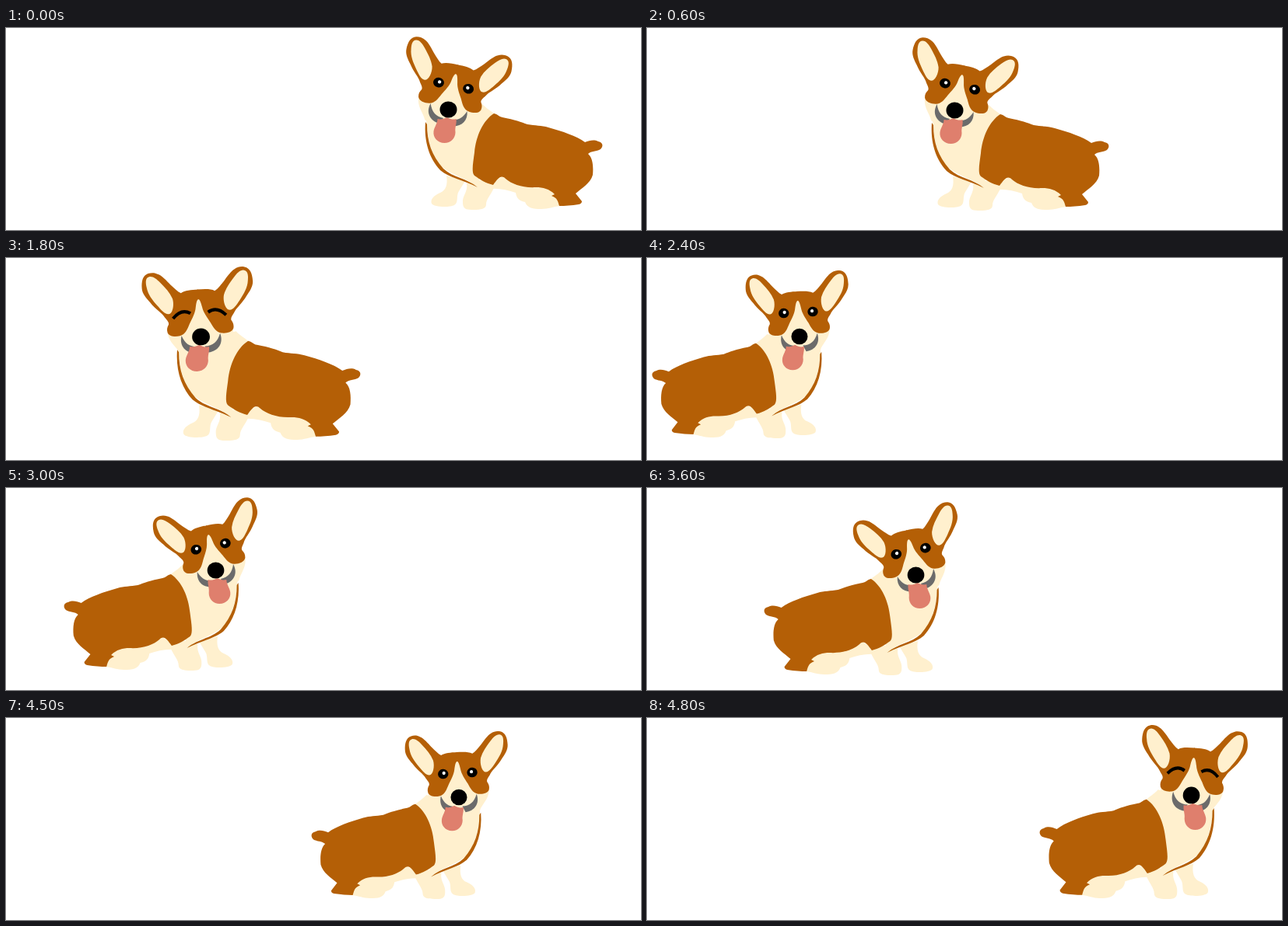
These frames come from a looping animation (816 px wide and 260 px high, 5.1 s). An HTML page:

```html
<!DOCTYPE html>
<html lang="en">
<head>
<meta charset="utf-8">
<title>Strolling corgi</title>
<style>
  html, body { margin: 0; width: 100%; height: 100%; overflow: hidden; background: #fff; }
  svg { display: block; width: 816px; height: 260px; }
  .brown { fill: #b45f06; }
  .cream { fill: #fff0ce; }
  .tongue { fill: #df7f6d; }
  .mouth { fill: #6b6b6b; }
  .lid { fill: none; stroke: #000; stroke-width: 4; }
</style>
</head>
<body>
<svg viewBox="0 0 816 260">
  <defs>
    <g id="fur">
      <path class="brown" d="M-.5-59C8-59 16-59 21-56C25-58 29-63 33-67C38-73 43-79 47-81C52-84 56-84 60-83C67-81 69-74 69-65C69-58 64-52 60-47C54-38 46-33 43-27C41-24 38-21 39-18C41-15 42-12 41-8C39-3 32-2 26-3C19-4 16-11 13-17C9-24 5-30 4-37C3-42 2-47-.5-47Z"/>
      <path class="cream" d="M59-79C55-80 50-76 46-71C40-64 35-58 32-50C30-42 33-31 38-31C43-31 47-37 51-42C57-50 62-57 63-66C64-72 64-78 59-79Z"/>
      <path class="mouth" d="M24-3C28 10 20 19 8 20L4 12C14 12 20 8 24-3Z"/>
    </g>
    <g id="eye"><ellipse cx="19.500" cy="-31.500" rx="7" ry="6.300"/></g>
    <path id="lid" class="lid" d="M11-30Q22-37 33-25"/>
  </defs>
  <g id="dog">
    <g class="cream">
      <path d="M566 190C568 202 565 209 558 212C549 216 545 221 547 226C550 231 571 231 576 228C582 225 578 216 582 210L590 197Z"/>
      <path d="M592 200C594 211 586 216 587 225C587 234 593 234 601 234C610 234 617 233 617 227C617 221 622 216 627 206L637 189Z"/>
      <path d="M622 207C634 206 645 209 655 212C656 218 658 222 667 224C670 232 677 233 688 233C697 233 703 230 712 229L705 209L640 188Z"/>
      <path d="M540 116C541 140 545 160 558 177C570 188 586 191 606 204L627 110C622 106 618 104 612 98Z"/>
    </g>
    <path class="brown" d="M539 121C537 146 544 168 558 183C570 193 586 195 606 205C592 193 575 193 562 181C547 164 541 146 541 124Z"/>
    <path class="brown" d="M627 110C632 111 633 114 638 115C654 118 662 121 670 124C680 126 688 125 697 128C715 133 733 139 744 147C750 145 755 143 761 146C767 147 768 152 764 156C759 159 752 158 748 162C754 167 755 178 754 189C751 200 740 206 732 213L740 223Q740 226 736 227Q722 229 711 229C709 223 709 219 701 216L705 214C698 207 690 205 681 205C664 206 650 201 642 194C636 188 632 194 626 202C617 200 609 195 602 190C598 186 600 175 602 160C604 139 613 119 627 110Z"/>
    <g id="head">
      <path class="cream" d="M0-50L-20-25L-41-8C-40 5-31 10-27 19C-12 27 12 27 27 19C31 10 40 5 41-8L20-25Z"/>
      <use href="#fur"/><use href="#fur" transform="scale(-1 1)"/>
      <g id="open">
        <use href="#eye"/><use href="#eye" transform="scale(-1 1)"/>
        <g fill="#fff"><circle cx="18.500" cy="-32.500" r="2.200"/><circle cx="-18.500" cy="-32.500" r="2.200"/></g>
      </g>
      <g id="shut"><use href="#lid"/><use href="#lid" transform="scale(-1 1)"/></g>
    </g>
    <path id="tongue" class="tongue" d="M-14 12C-9 13-6 12-2 10C3 13 7 13 10 12C11 18 8 23 9 29C9 37 3 43-5 43C-14 43-20 36-19 28C-18 22-14 18-14 12Z"/>
    <ellipse id="nose" rx="11" ry="10.500"/>
  </g>
</svg>
<script>
const STEP = 300, TAIL = 767, FLOOR = 234, NOSE = [568.5, 105];
const LEFT = 1, RIGHT = -1;

// Head tilt, head lift, tongue placement and body scale of each pose
const poses = {
  tilt:    { turn: 12, lift: 0, lick: '', sx: 1, sy: 1 },
  lean:    { turn: -4, lift: 0, lick: '', sx: .985, sy: 1.035 },
  neutral: { turn: 3, lift: -4, lick: 'translate(4 1) scale(-1 1)', sx: .957, sy: .985 }
};
const { tilt, lean, neutral } = poses;
const smile = { ...lean, shut: true };
const bigSmile = { ...smile, sx: 1.035 };
const wide = { ...neutral, sx: 1 };

// Facing, tail x, ground y, pose
const steps = [
  [LEFT, 767, 234, tilt], [LEFT, 690, 241, tilt], [LEFT, 594, 235, tilt],
  [LEFT, 594, 242, lean], [LEFT, 594, 243, bigSmile], [LEFT, 513, 235, tilt],
  [LEFT, 456, 235, bigSmile], [LEFT, 353, 233, neutral],
  [RIGHT, 6, 232, neutral], [RIGHT, 25, 233, neutral], [RIGHT, 74, 235, tilt],
  [RIGHT, 135, 242, lean], [RIGHT, 150, 241, tilt], [RIGHT, 260, 242, lean],
  [RIGHT, 365, 234, wide], [RIGHT, 392, 233, neutral], [RIGHT, 504, 233, smile]
];

const move = (id, value) => document.getElementById(id).setAttribute('transform', value);
const show = (id, on) => document.getElementById(id).style.display = on ? '' : 'none';

function draw() {
  const i = Math.floor(performance.now() / STEP) % steps.length;
  const [facing, x, y, pose] = steps[i];
  const sx = pose.sx * (facing === RIGHT && pose === tilt ? .985 : 1);
  const at = `translate(${NOSE[0]} ${NOSE[1] + pose.lift})`;
  move('dog', `translate(${x} ${y}) scale(${facing * sx} ${pose.sy}) translate(${-TAIL} ${-FLOOR})`);
  move('head', `${at} rotate(${pose.turn})`);
  move('tongue', `${at} ${pose.lick}`);
  move('nose', at);
  show('open', !pose.shut);
  show('shut', pose.shut);
  requestAnimationFrame(draw);
}
draw();
</script>
</body>
</html>
```
